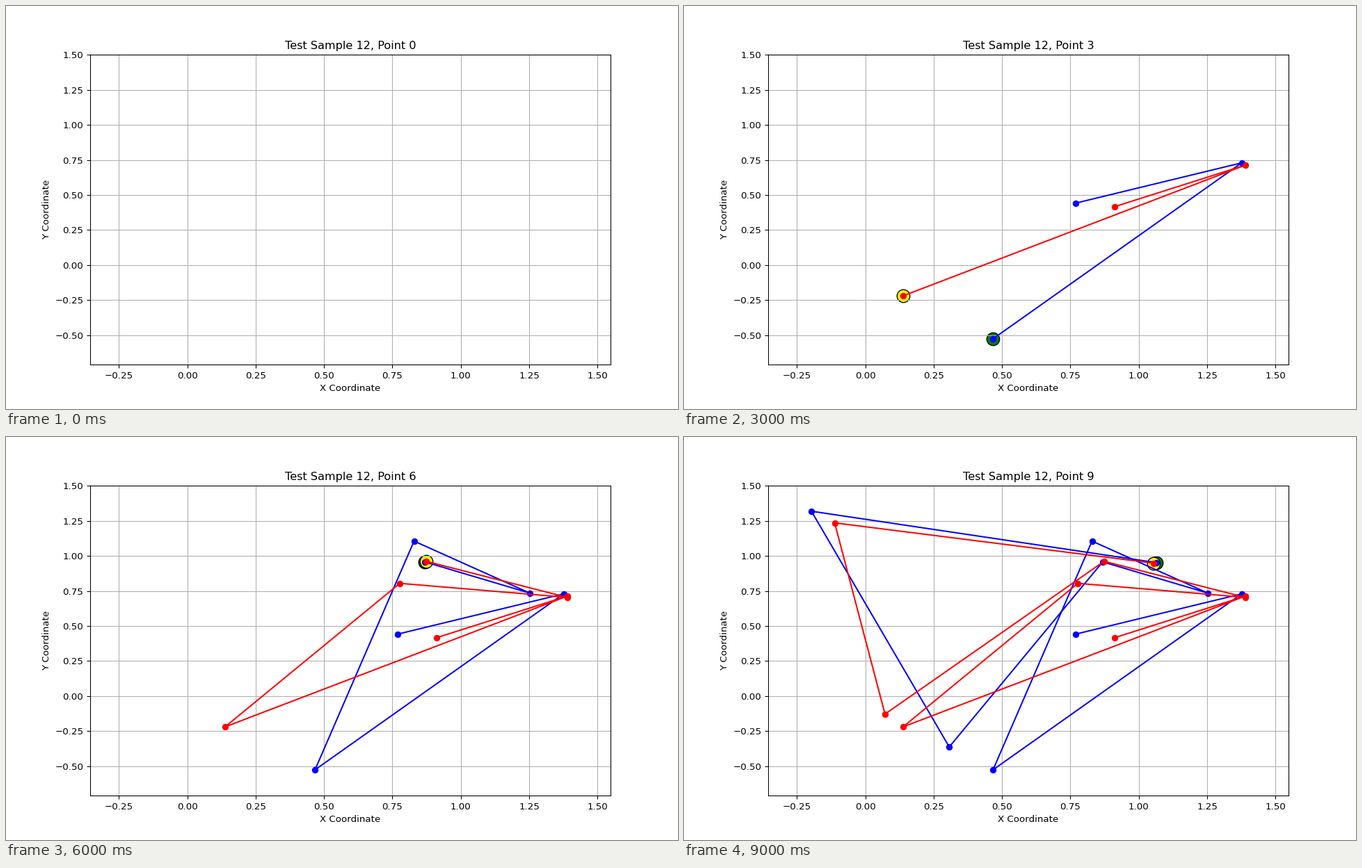
Write a matplotlib script that moves like this. It is 966 by 580 pixels and loops after 10000 ms.

```python
import matplotlib.pyplot as plt
import numpy as np
from matplotlib.animation import FuncAnimation

DPI = 96.6
MARGIN = 0.1

# Key points of each path, written as x + yj
actual = np.array([0.769 + 0.442j, 1.376 + 0.729j, 0.467 - 0.525j,
                   0.829 + 1.105j, 1.253 + 0.734j, 0.868 + 0.957j,
                   0.307 - 0.362j, -0.197 + 1.318j, 1.063 + 0.952j])
predicted = np.array([0.912 + 0.417j, 1.3897 + 0.713j, 0.138 - 0.219j,
                      0.777 + 0.804j, 1.389 + 0.704j, 0.873 + 0.961j,
                      0.072 - 0.128j, -0.112 + 1.235j, 1.053 + 0.948j])


def padded(values):
    low, high = values.min(), values.max()
    pad = MARGIN * (high - low)
    return low - pad, high + pad


fig, ax = plt.subplots(figsize=(966.01 / DPI, 580.01 / DPI), dpi=DPI)
everything = np.concatenate([actual, predicted])
ax.set_xlim(padded(everything.real))
ax.set_ylim(padded(everything.imag))
ax.set_xlabel("X Coordinate")
ax.set_ylabel("Y Coordinate")
ax.grid(True)
title = ax.set_title("")


def make_track(path, color, head_color, label):
    head = ax.scatter([], [], s=190, color=head_color,
                      edgecolors="black", linewidths=1)
    line, = ax.plot([], [], "o-", color=color, label=label)
    return path, head, line


tracks = [
    make_track(actual, "blue", "green", "Actual"),
    make_track(predicted, "red", "yellow", "Predicted"),
]
legend = ax.legend(loc="upper right")


def draw(count):
    title.set_text(f"Test Sample 12, Point {count}")
    legend.set_visible(count == 1)
    for path, head, line in tracks:
        shown = path[:count]
        line.set_data(shown.real, shown.imag)
        head.set_offsets(np.column_stack([shown.real, shown.imag])[-1:])
    return []


anim = FuncAnimation(fig, draw, frames=len(actual) + 1, interval=1000,
                     init_func=lambda: draw(0), repeat=True, repeat_delay=0)
plt.show()
```
